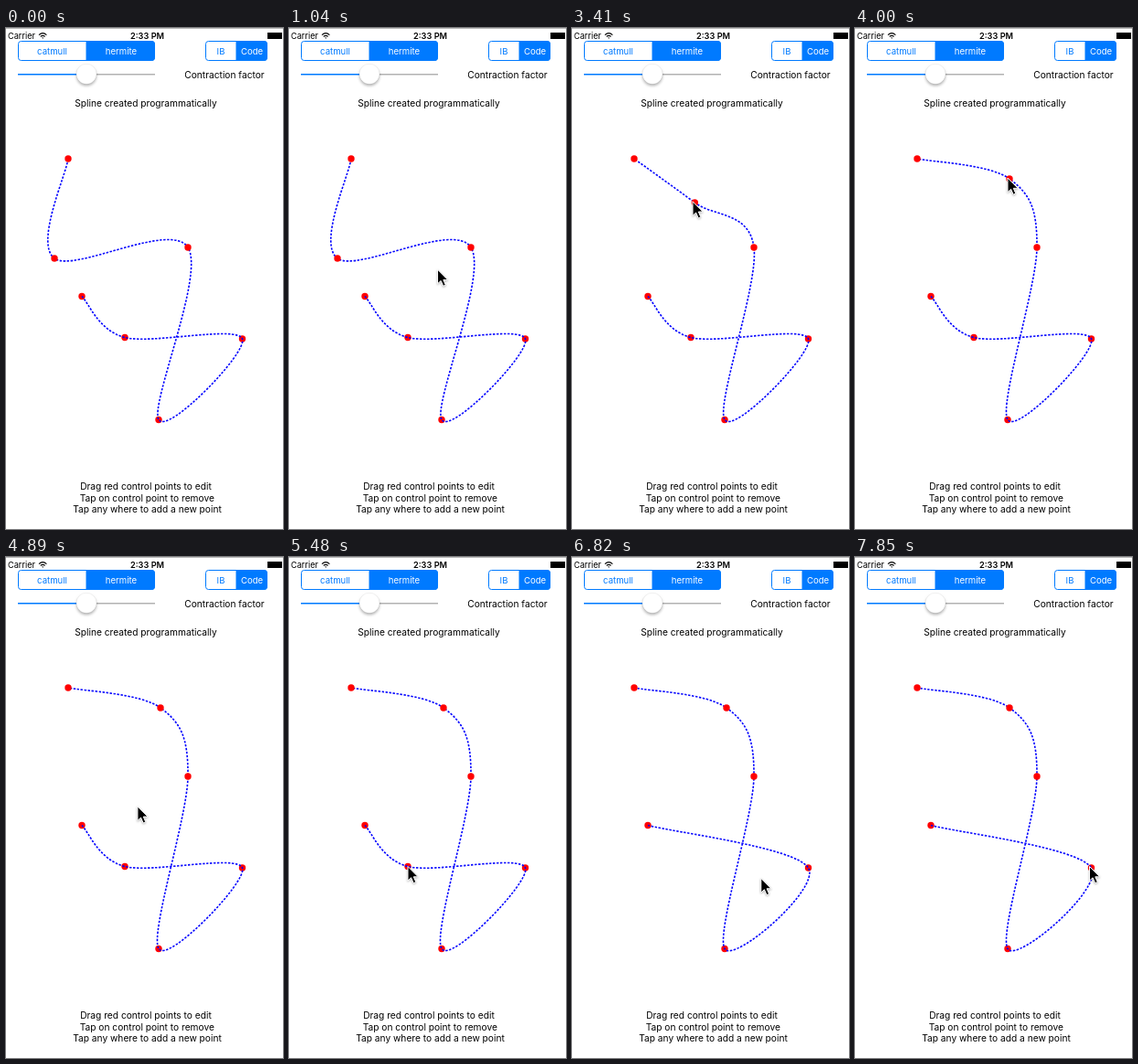
Animation, 303 px wide and 548 px high, one loop 8000 ms. Source, as an HTML page:

```html
<!DOCTYPE html>
<html lang="en">
<head>
<meta charset="utf-8">
<title>Spline editor</title>
<style>
  html, body { margin: 0; width: 100%; height: 100%; overflow: hidden; background: #fff; }
  svg { display: block; width: 303px; height: 548px; font: 10.2px Inter, "Liberation Sans", sans-serif; }
  .mid { text-anchor: middle; }
  .tab { font-size: 9.6px; text-anchor: middle; fill: #007aff; }
  .on { fill: #fff; }
  .status { font-size: 9.2px; }
  .bold { font-weight: 600; }
  #thumb { filter: drop-shadow(0 2px 1.6px rgba(0, 0, 0, .3)); }
  #cursor { filter: drop-shadow(0 1px 1px rgba(0, 0, 0, .3)); }
</style>
</head>
<body>
<svg viewBox="0 0 303 548">
  <rect width="303" height="548" fill="#fff"/>
  <rect width="303" height="1" fill="#bbb"/>

  <text class="status" x="2" y="12">Carrier</text>
  <g fill="none" stroke="#000" stroke-width="1.2">
    <path d="M36 7.6Q40.2 3.8 44.4 7.6M37.7 9.4Q40.2 7.2 42.7 9.4"/>
    <path d="M39 10.4h2.4l-1.2 1.4z" fill="#000" stroke="none"/>
  </g>
  <text class="status bold mid" x="154.5" y="12">2:33 PM</text>
  <rect x="286" y="5" width="16" height="7"/>

  <g fill="none" stroke="#007aff">
    <rect x="13.5" y="14.5" width="149" height="21" rx="3"/>
    <path d="M88 14.5h71.5a3 3 0 0 1 3 3v15a3 3 0 0 1-3 3H88z" fill="#007aff"/>
    <rect x="218.5" y="14.5" width="67" height="21" rx="3"/>
    <path d="M252 14.5h30.5a3 3 0 0 1 3 3v15a3 3 0 0 1-3 3H252z" fill="#007aff"/>
  </g>
  <text class="tab" x="50.5" y="29">catmull</text>
  <text class="tab on" x="126" y="29">hermite</text>
  <text class="tab" x="235" y="29">IB</text>
  <text class="tab on" x="269" y="29">Code</text>

  <path d="M88 50.8H163" stroke="#b2b2b2" stroke-width="1.6"/>
  <path d="M13 50.8H88" stroke="#007aff" stroke-width="1.6"/>
  <circle id="thumb" cx="88" cy="50.3" r="11" fill="#fff" stroke="#000" stroke-opacity=".1" stroke-width=".5"/>
  <text class="mid" x="239" y="54.5">Contraction factor</text>
  <text class="mid" x="153" y="86">Spline created programmatically</text>

  <g id="under" fill="#f00"></g>
  <path id="curve" fill="none" stroke="#00f" stroke-width="1.6" stroke-dasharray="2.4 1.6"/>
  <g id="over" fill="#f00"></g>

  <g class="mid">
    <text x="153" y="505">Drag red control points to edit</text>
    <text x="154.3" y="517.5">Tap on control point to remove</text>
    <text x="154.5" y="530">Tap any where to add a new point</text>
  </g>

  <path id="cursor" d="M0 0V15.6L3.6 12.3L6.2 18.2L8.8 17L6.3 11.3H11.2Z" stroke="#fff" stroke-width="1"/>
</svg>
<script>
const LOOP = 8000, CONTRACTION = 0.5;
const APPEAR_AT = 750, REMOVE_AT = 6230, TICK = 147.7;
const DRAG = { from: 2830, to: 4000 };
const $ = id => document.getElementById(id);

const cursorMoves = [
  { from: APPEAR_AT, to: 1040, at: [160, 250] },
  { from: 1940, to: 2380, at: [50, 250] },
  { ...DRAG, at: [167, 164] },
  { from: 4440, to: 5480, at: [130, 338.5] },
  { from: 6520, to: 6820, at: [207, 351.5] },
  { from: 6820, to: 7700, at: [256.5, 338.5] }
];

// Sine ease-out, 0 before the move and 1 after it
function progress({ from, to }, t) {
  const p = Math.min(Math.max((t - from) / (to - from), 0), 1);
  return Math.sin(p * Math.PI / 2);
}
const mix = (a, b, p) => a.map((v, axis) => v + (b[axis] - v) * p);

// The picture advances in steps, as a screen recording does
const stepTime = t => APPEAR_AT + Math.floor((t - APPEAR_AT) / TICK + 0.02) * TICK;

const cursorAt = t =>
  cursorMoves.reduce((pos, move) => mix(pos, move.at, progress(move, t)), [169, 300]);

function pointsAt(t) {
  const dragged = mix([53, 252], [169, 165], progress(DRAG, t));
  const points = [[83, 293.5], [130, 338.5], [258.5, 340], [167, 428.5], [199, 240], dragged, [68, 143]];
  if (t >= REMOVE_AT - TICK / 2) points.splice(1, 1);
  return points;
}

function hermitePath(points) {
  const last = points.length - 1;
  const handle = (i, axis) => {
    const next = points[Math.min(i + 1, last)], prev = points[Math.max(i - 1, 0)];
    return CONTRACTION * (next[axis] - prev[axis]) / 3;
  };
  let d = "M" + points[0];
  for (let i = 0; i < last; i++) {
    const out = points[i].map((v, axis) => v + handle(i, axis));
    const into = points[i + 1].map((v, axis) => v - handle(i + 1, axis));
    d += `C${out} ${into} ${points[i + 1]}`;
  }
  return d;
}

const dots = points => points.map(([x, y]) => `<circle cx="${x}" cy="${y}" r="3.7"/>`).join("");

function render(time) {
  const t = stepTime(time), points = pointsAt(t);
  $("curve").setAttribute("d", hermitePath(points));
  $("under").innerHTML = dots(points.slice(0, -3));
  $("over").innerHTML = dots(points.slice(-3));
  $("cursor").style.display = t < APPEAR_AT ? "none" : "";
  $("cursor").setAttribute("transform", `translate(${cursorAt(t)})`);
}

const start = performance.now();
function tick() {
  render((performance.now() - start) % LOOP);
  requestAnimationFrame(tick);
}
tick();
</script>
</body>
</html>
```
